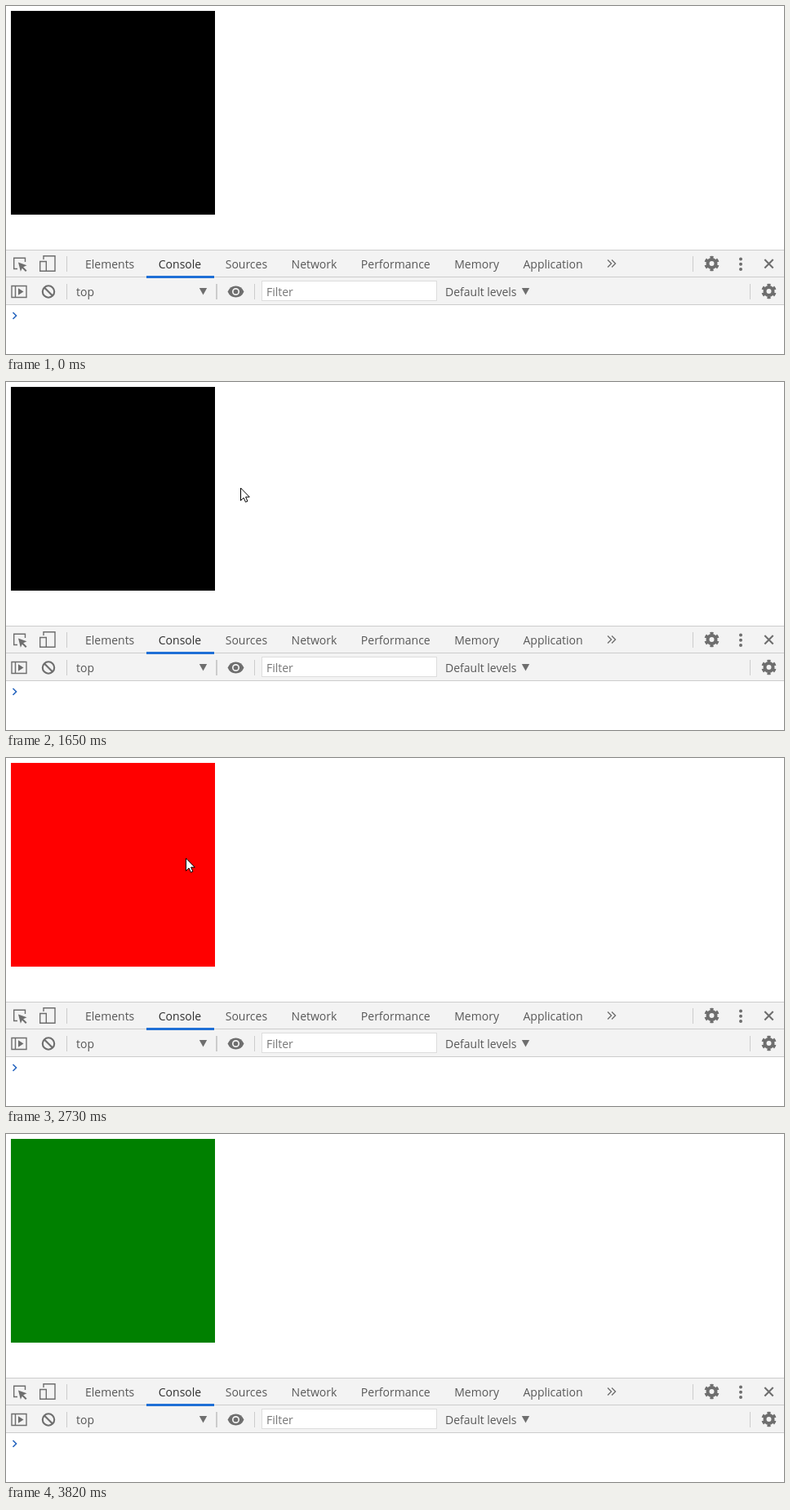
Animation of 953 by 427 pixels, one loop 4.14 s. Source, as an HTML page:

```html
<!DOCTYPE html>
<html lang="en">
<head>
<meta charset="utf-8">
<title>Hover colours</title>
<style>
  html, body { margin: 0; width: 100%; height: 100%; overflow: hidden; background: #fff; }
  svg { display: block; width: 100%; height: 100%; }
  text { font: 14px "Open Sans", "Noto Sans", sans-serif; fill: #585858; }
  .active { fill: #303030; }
  .hint { fill: #777; }
  .solid { fill: #6e6e6e; }
  .line { fill: none; stroke: #6e6e6e; stroke-width: 1.4; }
  .bold { stroke-width: 2.1; }
  .rule { fill: none; stroke: #ccc; }
</style>
</head>
<body>
<svg viewBox="0 0 953 427">
  <defs>
    <g id="gear" fill="none" stroke="#6e6e6e">
      <circle r="5" stroke-width="4"/>
      <circle r="7.7" stroke-width="3" pathLength="12" stroke-dasharray="1" stroke-dashoffset="-.5"/>
    </g>
    <path id="drop" class="solid" d="M0 0h9.4l-4.7 8.500z"/>
    <path id="chevron" fill="none" d="M0 -4.500l4.500 4.500-4.500 4.500"/>
  </defs>

  <rect id="box" x="6" y="6" width="250" height="250"/>

  <rect y="299" width="953" height="68" fill="#f3f3f3"/>
  <path class="rule" d="M0 299.5H953M0 332.5H953M0 366.5H953"/>
  <path class="rule" d="M74.5 307v19M841.5 307v19M74.5 341v19M304.5 341v19M911.5 341v19"/>
  <path class="rule" d="M258 341v19" stroke-width="2"/>
  <rect x="172" y="331" width="83" height="3" fill="#1f6fd6"/>

  <!-- tab bar -->
  <path class="line" d="M14 322.500H9.700V309.200H23.500V314"/>
  <path class="solid" d="M15 314.500l10.500 3.800-4.300 2 4.300 4.300-1.500 1.400-4.200-4.300-1.900 4z"/>
  <path class="line" d="M46 311V306.700H60V325.300H50M41.700 313.500h7.600v11.800h-7.600z"/>
  <text id="tabs" x="97" y="322"></text>
  <g class="line"><use href="#chevron" x="737" y="316"/><use href="#chevron" x="742" y="316"/></g>
  <use href="#gear" x="864.5" y="316"/>
  <path class="line" d="M900 310.500v13" style="stroke-width:4;stroke-linecap:round;stroke-dasharray:0 6.3"/>
  <path class="line bold" d="M929.300 311l10.400 10.400m0-10.400l-10.400 10.400"/>

  <!-- console bar -->
  <path class="line" d="M7 343.500h18v14H7zm4.500 0v14"/>
  <path class="solid" d="M15 346.300l6.500 4.200-6.500 4.200z"/>
  <g class="line bold"><circle cx="52" cy="350.500" r="7.2"/><path d="M47 345.500l10 10"/></g>
  <text x="86" y="356">top</text>
  <use href="#drop" x="236.800" y="346"/>
  <path class="solid" d="M271.500 350.500q3-7 10-7t10 7q-3 7-10 7t-10-7z"/>
  <circle class="solid" cx="281.500" cy="350.500" r="3.700" stroke="#f3f3f3" stroke-width="1.700"/>
  <rect x="313.500" y="337.500" width="214" height="24" fill="#fff" stroke="#ddd"/>
  <text class="hint" x="319" y="356">Filter</text>
  <text x="538" y="356">Default levels</text>
  <use href="#drop" x="631.800" y="346"/>
  <use href="#gear" x="934.5" y="350"/>
  <use href="#chevron" stroke="#2867c0" stroke-width="1.800" transform="translate(8.500 380) scale(.9)"/>

  <circle id="press" cx="216.500" cy="123.500" r="8.500" fill="#ff0" fill-opacity=".47"/>
  <path id="pointer" fill="#fff" stroke="#000" d="M.5 1V16.500l3.600-3.400 2.400 5.200 2.400-1.100-2.300-5.100h4.700z"/>
</svg>
<script>
const LOOP = 4140, TICK = 76.5, EXIT = 3820;
const byId = id => document.getElementById(id);

const tabs = ["Elements", "Console", "Sources", "Network", "Performance", "Memory", "Application"];
byId("tabs").innerHTML = tabs.map((name, i) =>
  `<tspan dx="${i && 29.5}" class="${name === "Console" ? "active" : ""}">${name}</tspan>`).join("");

const rest = [324, 132], inside = [214, 122], outside = [330, 120];
const strokes = [
  { begin: 190, lead: -0.5, length: 14.1, curve: [[939, 404], [878, 48], [500, 159], rest] },
  { begin: 1500, lead: 0.48, length: 3.89, curve: [rest, inside] },
  { begin: 2590, lead: 0.48, length: 3.89, curve: [inside, outside] },
  { begin: 3220, lead: -0.8, length: 7.8, curve: [outside, [865, 380]] }
];

const smooth = s => s * s * (3 - 2 * s);
const mix = (p, q, u) => p.map((value, i) => value + (q[i] - value) * u);

function bezier(points, u) {
  if (points.length === 1) return points[0];
  return bezier(points.slice(1).map((point, i) => mix(points[i], point, u)), u);
}

function tipAt(t) {
  const stroke = strokes.findLast(({ begin }) => t >= begin);
  if (!stroke || t >= EXIT) return null;
  const step = Math.floor((t - stroke.begin + 10) / TICK);
  const progress = Math.min(1, Math.max(0, (step - stroke.lead) / stroke.length));
  return bezier(stroke.curve, smooth(progress)).map(Math.round);
}

function draw(t) {
  const tip = tipAt(t);
  byId("box").setAttribute("fill", t < 1720 ? "black" : t < 2810 ? "red" : "green");
  byId("press").style.display = t >= 1960 && t < 2110 ? "" : "none";
  byId("pointer").style.display = tip ? "" : "none";
  if (tip) byId("pointer").setAttribute("transform", `translate(${tip})`);
}

const start = performance.now();
function play() {
  draw((performance.now() - start) % LOOP);
  requestAnimationFrame(play);
}
play();
</script>
</body>
</html>
```
